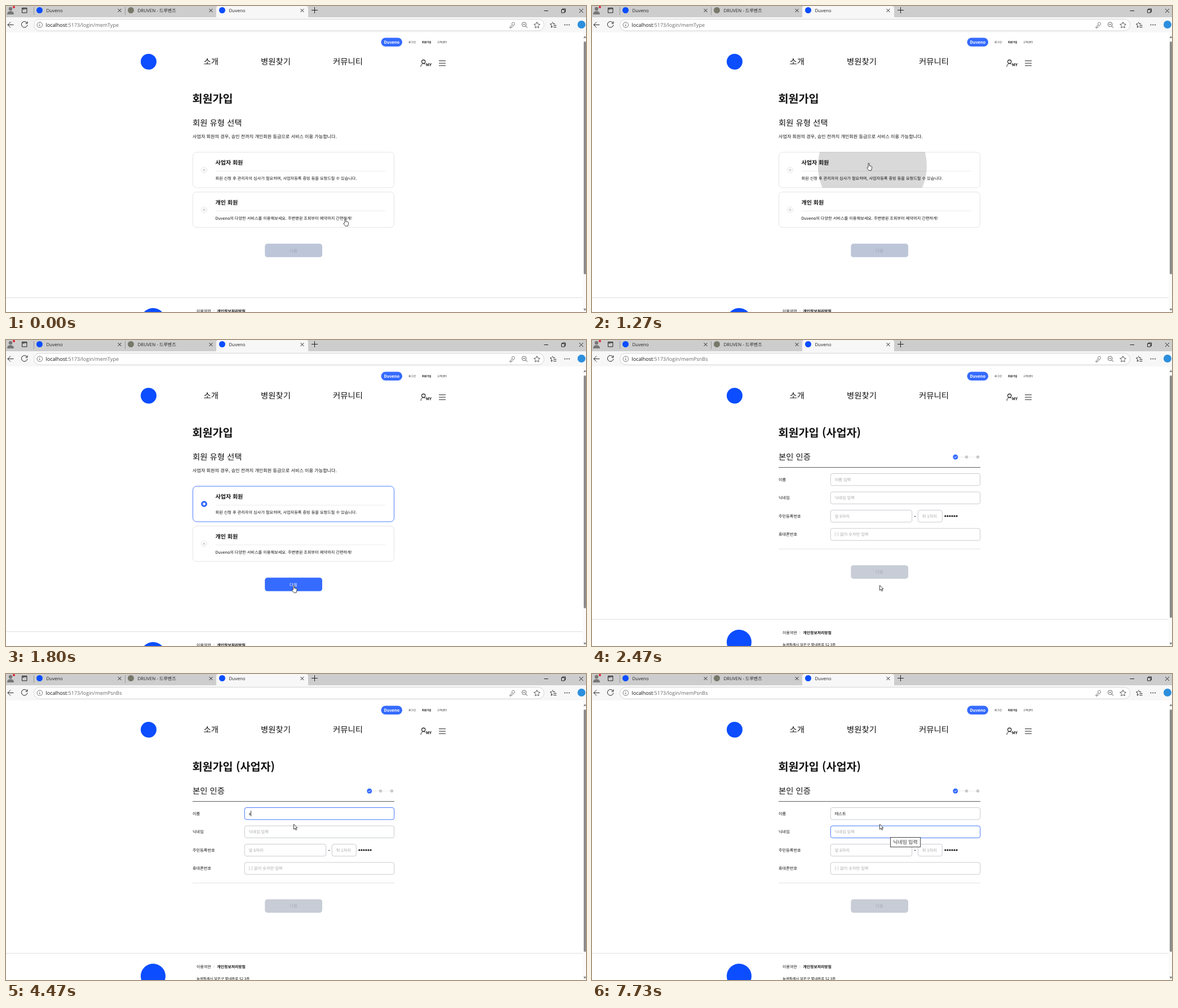
An HTML page for the animation above (8000 ms loop, 1029x544 px).

```html
<!DOCTYPE html>
<html lang="ko">
<head>
<meta charset="utf-8">
<title>회원가입</title>
<style>
  html, body { margin: 0; width: 100%; height: 100%; overflow: hidden; background: #fff; }
  svg { display: block; width: 100vw; height: 100vh; }
  text { font-family: "Noto Sans CJK KR", "Noto Sans CJK JP", "Noto Sans CJK", sans-serif; text-rendering: geometricPrecision; white-space: pre; }
  .ui text { font-family: "Open Sans", "Noto Sans CJK KR", "Noto Sans CJK JP", sans-serif; }
  .icon { fill: none; stroke: #222; stroke-width: 1; }
</style>
</head>
<body>
<svg id="stage" viewBox="0 0 1029 544" preserveAspectRatio="none"></svg>
<script>
const BLUE = '#356bff', LOGO = '#0b4dff', INK = '#111', GRAY = '#c9cbd0', HOVER = '#858585';
const BRAND = 'Duveno';

// y is the middle of the glyphs
const text = (x, y, size, str, weight = 500, fill = INK, extra = '') =>
  `<text x="${x}" y="${y + size * .38}" font-size="${size}" font-weight="${weight}" fill="${fill}" ${extra}>${str}</text>`;
const rect = (x, y, w, h, r, fill, extra = '') =>
  `<rect x="${x}" y="${y}" width="${w}" height="${h}" rx="${r}" fill="${fill}" ${extra}/>`;
const dot = (x, y, r, fill, extra = '') => `<circle cx="${x}" cy="${y}" r="${r}" fill="${fill}" ${extra}/>`;
const line = (x1, y1, x2, y2, stroke) => `<path d="M${x1} ${y1}L${x2} ${y2}" stroke="${stroke}"/>`;
const icon = (d, extra = '') => `<path class="icon" d="${d}" ${extra}/>`;

const tab = (x, str, color) =>
  dot(x, 7.5, 5.5, color) + text(x + 12, 7.6, 8, str, 400, '#222') +
  icon(`M${x + 139} 5l6 6m0-6l-6 6`);

const browser = () => `<g class="ui">
  ${rect(0, 0, 1029, 20, 0, '#cdcdcd')}
  ${rect(0, 20, 1029, 27, 0, '#f7f7f7')}
  <path d="M373 20V4q0-4 4-4H532q4 0 4 4V20z" fill="#f7f7f7"/>
  ${dot(8, 5, 3.2, '#777')}<path d="M2 15q0-6 6-6t6 6z" fill="#777"/>${dot(14, 2, 2, '#e02030')}
  ${icon('M28.5 3.5h8.5v8.5h-8.5zM28.5 5h8.5M31 5v2')}
  ${line(49.5, 2, 49.5, 16, '#999')}${line(211.5, 2, 211.5, 16, '#999')}
  ${tab(59.5, BRAND, LOGO)}${tab(221.5, 'DRUVEN - 드루벤즈', '#77786a')}${tab(383.5, BRAND, LOGO)}
  ${icon('M542 7.5h11M547.5 2v11')}
  ${icon('M954.500 8.500h7.500M985.500 6.500h5.500v5.500h-5.500zM987 6.500v-1.500h5.500v5.500h-1.500M1017 5l7 7m0-7l-7 7')}
  ${icon('M13.500 33.500H3m5-5l-5 5 5 5')}
  ${icon('M37.500 30.500a5.300 5.300 0 1 0 .500 3M38 27.500v3.500h-3.500')}
  ${rect(49.5, 23.5, 905, 20.5, 10.2, '#fff', 'stroke="#d4d4d4"')}
  ${dot(59.8, 33.6, 4.8, 'none', 'stroke="#666" stroke-width=".9"')}
  <path d="M59.800 33v3M59.800 30.800v1" stroke="#555"/>
  <text x="70.500" y="37" font-size="9" fill="#111">localhost<tspan fill="#666">:5173/login/</tspan><tspan id="route" fill="#666"></tspan></text>
  <g stroke-width=".8">
    ${dot(900, 31.8, 2.6, 'none', 'stroke="#666"')}
    ${icon('M898 33.500l-4 4v1.500h2l.500-1.500h1.500l2-2', 'style="stroke:#666"')}
    ${dot(919.2, 32.8, 3.9, 'none', 'stroke="#444"')}
    ${icon('M922 35.600l3 3M917.300 32.800h3.800', 'style="stroke:#444"')}
  </g>
  ${icon('M942 28.500l1.600 3.500 3.800.500-2.800 2.600.700 3.800-3.300-1.900-3.300 1.900.700-3.800-2.800-2.600 3.800-.500z', 'style="stroke:#555"')}
  ${icon('M969.500 28.500l1.400 3 3.300.500M968.500 31.500l-3 .500 2.400 2.500-.600 3.600 3-1.700M971.500 34.500h5M971.500 37.500h5')}
  ${[991.5, 995.3, 999.1].map(x => dot(x, 33.5, .9, '#222')).join('')}
  ${dot(1021, 33, 7, '#2c8fdd')}
</g>`;

const header = () => `
  ${dot(253, 99, 14, LOGO)}
  ${rect(665.5, 56.5, 37.5, 15.5, 7.7, BLUE)}
  ${text(684.3, 64.2, 7.3, BRAND, 700, '#fff', 'text-anchor="middle"')}
  ${text(714, 64, 4.7, '로그인')}${text(737.7, 64, 4.6, '회원가입', 700)}${text(765, 64, 4.6, '고객센터')}
  ${text(350.5, 99, 14.4, '소개')}${text(452, 99, 14.4, '병원찾기')}${text(580, 99, 14.4, '커뮤니티')}
  ${dot(740.7, 99, 3.1, 'none', 'stroke="#111" stroke-width="1.1"')}
  ${icon('M736 108q0-5.500 5-5.500 2.500 0 3.500 1.200')}
  ${text(745, 104.7, 7, 'MY', 700)}
  ${icon('M768 97.500h12M768 101.800h12M768 106h12')}`;

const footer = dy => `<g transform="translate(0 ${dy})">
  ${line(0, 496.5, 1023, 496.5, '#dedede')}
  ${dot(261, 537, 22, LOGO)}
  ${text(338, 520.5, 7, '이용약관', 400)}${line(369, 518, 369, 523, '#ddd')}
  ${text(374.5, 520.5, 6.85, '개인정보처리방침', 700)}
  ${text(338, 541.5, 6.4, '늘샘특례시 달온구 별내음로 52 3층', 500)}
</g>`;

const card = (y, id, title, note) =>
  rect(331.5, y, 357, 63, 6.5, '#fff', `id="${id}" stroke="#e4e4e4"`) +
  dot(351.5, y + 31.5, 5, '#fff', `id="${id}Ring" stroke="#e2e2e2"`) +
  dot(351.5, y + 31.5, 2.2, '#d8d8d8', `id="${id}Dot"`) +
  text(371.5, y + 18, 10, title, 700) + line(372, y + 33.5, 673, y + 33.5, '#ececec') +
  text(371.5, y + 46.7, 7.2, note);

const button = (y, fill, ink, id) =>
  rect(459.3, y, 101.7, 24, 4.5, fill, `id="${id}"`) +
  text(510, y + 12.2, 7.5, '다음', 500, ink, `id="${id}Text" text-anchor="middle"`);

const typePage = () => `<g id="page1">
  ${text(330.5, 165, 19.6, '회원가입', 700)}
  ${text(331, 208, 14.4, '회원 유형 선택')}
  ${text(331, 232, 8.1, '사업자 회원의 경우, 승인 전까지 개인회원 등급으로 서비스 이용 가능합니다.')}
  ${card(260, 'biz', '사업자 회원', '회원 신청 후 관리자의 심사가 필요하며, 사업자등록 증빙 등을 요청드릴 수 있습니다.')}
  ${card(330.7, 'psn', '개인 회원', BRAND + '의 다양한 서비스를 이용해보세요. 주변병원 조회부터 예약까지 간편하게!')}
  <clipPath id="bizClip">${rect(331, 259.5, 358, 63.5, 6.5, '#000')}</clipPath>
  <g clip-path="url(#bizClip)">${dot(0, 0, 0, '#000', 'id="ripple"')}</g>
  ${button(422.6, '#bcc6d8', '#9aa5b8', 'next')}
  ${footer(22)}
</g>`;

const FIELDS = [ // x, y, width, label, placeholder
  [423.3, 237.5, 265.4, '이름', '이름 입력'],
  [423.3, 270, 265.4, '닉네임', '닉네임 입력'],
  [423.3, 302.5, 144.4, '주민등록번호', '앞 6자리'],
  [578.3, 302.5, 43, '', '뒤 1자리'],
  [423.3, 335, 265.4, '휴대폰번호', '[-] 없이 숫자만 입력']
];
const field = ([x, y, w, label, hint], i) =>
  rect(x, y, w, 21.3, 3.5, '#fff', `id="field${i}" stroke="${GRAY}"`) +
  text(331, y + 10.7, 7.2, label) + text(x + 7.4, y + 10.7, 7.2, hint, 400, '#a5a5a5', `id="hint${i}"`);

const formPage = () => `<g id="page2">
  ${text(330.5, 165, 19.6, '회원가입 (사업자)', 700)}
  ${text(331, 208, 14.4, '본인 인증')}
  ${line(650, 208, 682, 208, '#ececec')}
  ${dot(644.8, 208, 4.5, BLUE)}<path d="M642.800 208l1.500 1.500 2.600-2.800" fill="none" stroke="#fff"/>
  ${dot(664.5, 208, 2.8, '#c9c9c9')}${dot(684.5, 208, 2.8, '#c9c9c9')}
  ${line(331, 226.5, 689, 226.5, '#5c5c5c')}
  ${FIELDS.map(field).join('')}
  ${text(430.7, 248.2, 7.2, '', 500, INK, 'id="typed"')}
  <path id="caret" stroke="#111" stroke-width=".8"/>
  ${line(571.7, 313.5, 574.5, 313.5, '#333')}
  ${[0, 1, 2, 3, 4, 5].map(i => dot(626.8 + i * 4.05, 313, 1.6, INK)).join('')}
  ${line(331, 371.5, 689, 371.5, '#e3e3e3')}
  ${button(400.4, '#c7ccd6', '#a5abb7', 'send')}
  ${footer(0)}
  <g id="tip">${rect(529.5, 290.5, 53, 17, 0, '#fff', 'stroke="#444"')}${text(556, 299, 8.9, '닉네임 입력', 400, '#333', 'text-anchor="middle"')}</g>
</g>`;

const scrollbar = () => `
  ${rect(1023, 47, 6, 497, 0, '#fafafa')}
  <path d="M1024.500 57l2.500-4 2.500 4zM1024.500 538l2.500 4 2.500-4z" fill="#858585"/>
  ${rect(1025, 63, 4, 414, 2, '#8b8b8b', 'id="thumb"')}`;

const cursors = () => `<g id="mouse" stroke="#111" stroke-width=".8" stroke-linejoin="round" fill="#fff">
  <path id="hand" d="M-1 7.800V1.300a1 1 0 0 1 2 0V5l3.500.800q1.300.400 1.200 1.700l-.500 3.200-.800 2.600H.300L-2.800 9.500q-.700-1.200.300-1.600z"/>
  <path id="arrow" d="M0 0V9.200L2.200 7.200 3.700 10.500 5 9.900 3.600 6.700H6.500z"/>
  <path id="beam" fill="none" d="M-2.200-4.500H2.200M0-4.500V4.500M-2.200 4.500H2.200"/>
</g>`;

document.getElementById('stage').innerHTML =
  browser() + header() + typePage() + formPage() + scrollbar() + cursors();

const el = id => document.getElementById(id);
const set = (id, attrs) => { for (const k in attrs) el(id).setAttribute(k, attrs[k]); };
const show = (id, on) => set(id, { visibility: on ? 'visible' : 'hidden' });
const ramp = (t, a, b) => Math.min(1, Math.max(0, (t - a) / (b - a)));
const smooth = p => p * p * (3 - 2 * p);
const mix = (a, b, p) => `color-mix(in srgb, ${a}, ${b} ${p * 100}%)`;

const SWITCH = 2470, FOCUS = 3200, TAB = 7200;
const PATH = [ // time, x, y of the pointer
  [0, 602, 378], [265, 602, 378], [330, 602, 376], [465, 602, 376], [930, 491, 263], [1000, 491, 263],
  [1200, 491, 279], [1330, 491, 279], [1800, 510.5, 436], [2665, 510.5, 436],
  [3000, 495, 277], [3130, 497, 248], [3265, 497, 248], [3530, 510.5, 267], [8000, 510.5, 267]
];
const TYPING = [
  [FOCUS, ''], [4070, 'x'], [4200, 'xp'], [4470, 'x'], [4600, ''], [4670, 'x'], [4800, 'xp'],
  [5000, 'xpt'], [5070, 'xptm'], [5330, 'xpt'], [5470, 'xp'], [5600, 'x'], [5730, ''],
  [5930, 'ㅌ'], [6000, '테'], [6400, '텟'], [6470, '테스'], [6730, '테슽'], [6800, '테스트']
];

function pointer(t) {
  const i = Math.max(1, PATH.findIndex(k => k[0] >= t));
  const [t0, x0, y0] = PATH[i - 1], [t1, x1, y1] = PATH[i];
  const p = smooth(ramp(t, t0, t1));
  return [x0 + (x1 - x0) * p, y0 + (y1 - y0) * p];
}

function drawType(t) {
  const chosen = t >= 1400, grow = smooth(ramp(t, 1170, 1420));
  set('ripple', {
    cx: 491 + 19 * grow, cy: 281 + 10 * grow, r: 54 + 128 * grow,
    opacity: t < 1190 ? 0 : .148 * (1 - ramp(t, 1400, 1660))
  });
  set('biz', { stroke: chosen ? '#4f7dff' : '#e4e4e4' });
  set('bizRing', { fill: chosen ? BLUE : '#fff', stroke: chosen ? BLUE : '#e2e2e2' });
  set('bizDot', { fill: chosen ? '#fff' : '#d8d8d8' });
  const p = ramp(t, 1400, 1600);
  el('next').style.fill = mix('#bcc6d8', BLUE, p);
  el('nextText').style.fill = mix('#9aa5b8', '#fff', p);
}

function drawForm(t, hover) {
  const [last, str] = TYPING.filter(k => k[0] <= t + 4).pop() || [0, ''];
  const typed = el('typed'), next = t + 4 >= TAB;
  typed.textContent = str;
  show('hint0', !str);
  const cx = 431 + (next || !str ? 0 : typed.getComputedTextLength()), cy = next ? 275.5 : 243;
  set('caret', { d: `M${cx} ${cy}v10` });
  show('caret', last && Math.floor((t + 4 - (next ? TAB : last)) / 530) % 2 === 0);
  const leave = ramp(t, TAB - 65, TAB + 130);
  const focus = [ramp(t, FOCUS - 65, FOCUS + 130) - leave, leave];
  FIELDS.forEach((_, i) => {
    el('field' + i).style.stroke = mix(i === hover ? HOVER : GRAY, '#4477ff', focus[i] || 0);
  });
  show('tip', t + 4 >= 7730);
}

function draw(ms) {
  const step = 1000 / 15, t = Math.floor((ms + 4) / step) * step;
  const form = t + 4 >= SWITCH, [x, y] = pointer(t);
  el('page1').style.display = form ? 'none' : '';
  el('page2').style.display = form ? '' : 'none';
  el('route').textContent = form ? 'memPsnBs' : 'memType';
  set('thumb', { height: form ? 431 : 414 });

  const hover = form ? FIELDS.findIndex(f => x > f[0] && x < f[0] + f[2] && y > f[1] && y < f[1] + 21.3) : -1;
  const link = !form && (y < 394 || y > 422);
  set('mouse', { transform: `translate(${x} ${y})` });
  el('hand').style.display = link ? '' : 'none';
  el('beam').style.display = hover >= 0 ? '' : 'none';
  el('arrow').style.display = link || hover >= 0 ? 'none' : '';
  form ? drawForm(t, hover) : drawType(t);
}

const start = performance.now();
(function loop() {
  draw((performance.now() - start) % 8000);
  requestAnimationFrame(loop);
})();
</script>
</body>
</html>
```
